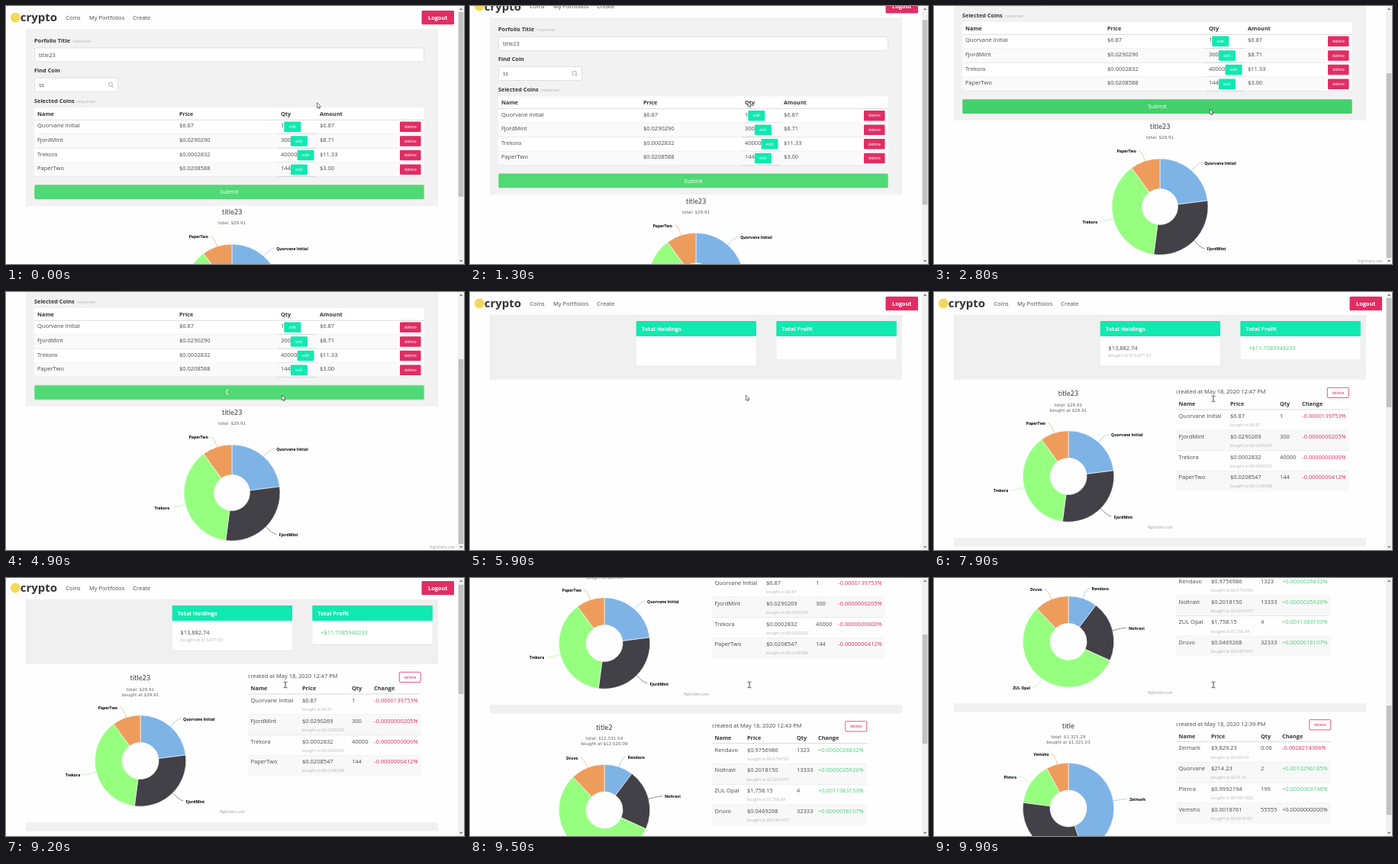
Recreate the animation shown at these times as an HTML page. Size 600 by 338 pixels, loop 10 s.

```html
<!DOCTYPE html>
<html lang="en">
<head>
<meta charset="utf-8">
<title>Crypto portfolio</title>
<style>
html, body { margin: 0; width: 100%; height: 100%; overflow: hidden; background: #fefefe; }
svg { display: block; width: 600px; height: 338px; }
text { font-family: "Open Sans", "Noto Sans", sans-serif; white-space: pre; }
.chart { font-family: "DejaVu Sans", sans-serif; }
</style>
</head>
<body>
<svg id="stage" viewBox="0 0 600 338"></svg>
<script>
const LOOP = 10000, STEP = 100, PITCH = 218.5;
const INK = '#4a4a4a', DARK = '#363636', PALE = '#b5b5b5', RED = '#e12d63';
const MINT = '#10e9b0', GREEN = '#51d975', GAIN = '#48cf78', LINE = '#dfdfdf';
const SLICES = ['#7eb3e6', '#434148', '#96ff80', '#ee9c5c'];

// name, price, quantity, amount
const picks = [
  ['Quorvane Initial', '$6.87', '1', '$6.87'],
  ['FjordMint', '$0.0290290', '300', '$8.71'],
  ['Trekora', '$0.0002832', '40000', '$11.33'],
  ['PaperTwo', '$0.0208588', '144', '$3.00']
];

// rows: name, price, bought at, quantity, change
const folios = [
  { title: 'title23', total: '$29.91', paid: '$29.91', time: '12:47', cols: [388, 453, 482], right: 543.5,
    shares: [6.87, 8.71, 11.33, 3],
    rows: [
      ['Quorvane Initial', '$6.87', '$6.87', '1', '-0.0000139753%'],
      ['FjordMint', '$0.0290269', '$0.0290290', '300', '-0.0000000205%'],
      ['Trekora', '$0.0002832', '$0.0002832', '40000', '-0.0000000000%'],
      ['PaperTwo', '$0.0208547', '$0.0208588', '144', '-0.0000000412%']
    ] },
  { title: 'title2', total: '$12,531.54', paid: '$12,520.09', time: '12:43', cols: [363, 428, 456], right: 520,
    shares: [1290.85, 2690.8, 7032.6, 1517.28],
    rows: [
      ['Rendavo', '$0.9756986', '$0.9754303', '1323', '+0.0000026832%'],
      ['Noltravi', '$0.2018150', '$0.2014557', '13333', '+0.0000035926%'],
      ['ZUL Opal', '$1,758.15', '$1,758.04', '4', '+0.0011383153%'],
      ['Druvo', '$0.0469268', '$0.0467457', '32333', '+0.0000018107%']
    ] },
  { title: 'title', total: '$1,321.29', paid: '$1,321.03', time: '12:39', cols: [363, 428, 456], right: 520,
    shares: [589.75, 428.46, 198.85, 104.23],
    rows: [
      ['Zelmark', '$9,829.23', '$9,829.51', '0.06', '-0.0028214366%'],
      ['Quorvane', '$214.23', '$214.10', '2', '+0.0013296185%'],
      ['Plimra', '$0.9992194', '$0.9991820', '199', '+0.0000003746%'],
      ['Vemsho', '$0.0018761', '$0.0018761', '55555', '+0.0000000000%']
    ] }
];

const rect = (x, y, w, h, fill, extra = '') =>
  `<rect x="${x}" y="${y}" width="${w}" height="${h}" fill="${fill}" ${extra}/>`;
const text = (x, y, s, size = 7.5, fill = INK, extra = '') =>
  `<text x="${x}" y="${y}" font-size="${size}" fill="${fill}" ${extra}>${s}</text>`;
const BOLD = 'font-weight="700"', MID = 'text-anchor="middle"', END = 'text-anchor="end"';
const bold = (x, y, s, fill = DARK) => text(x, y, s, 7.35, fill, BOLD);
const rule = (x1, x2, y, color = LINE, w = 0.6) =>
  `<path d="M${x1} ${y}H${x2}" stroke="${color}" stroke-width="${w}"/>`;
const button = (x, y, w, label, fill) =>
  rect(x, y, w, 13.5, fill, 'rx="1"') + text(x + w / 2, y + 8.6, label, 5.5, '#fff', MID);
const field = (y, w, s) =>
  rect(37.5, y, w, 18, '#fff', 'rx="1.5" stroke="#d6d6d6" stroke-width=".7"') + text(43, y + 11.8, s);

function header() {
  return `<circle cx="12.3" cy="15" r="6.4" fill="#f5d858"/>` +
    text(18.8, 20.3, 'crypto', 15, DARK, BOLD) +
    text(78.3, 17.8, 'Coins') + text(109, 17.8, 'My Portfolios') + text(166.3, 17.8, 'Create') +
    rect(544.5, 6, 42.5, 18.3, RED, 'rx="1.5"') +
    text(565.7, 17.9, 'Logout', 7.35, '#fff', BOLD + ' ' + MID);
}

// Donut whose slices grow from the inner ring by k, labels at the end
function donut(cx, cy, R, hole, shares, names, k = 1, labels = true) {
  const sum = shares.reduce((a, b) => a + b), r = hole + (R - hole) * k;
  const at = (a, d) => [cx + Math.sin(a) * d, cy - Math.cos(a) * d];
  const pt = (a, d) => at(a, d).map(v => v.toFixed(2)).join(' ');
  let acc = 0, out = '';
  shares.forEach((v, i) => {
    const turn = 2 * Math.PI * k / sum, a = acc * turn, b = (acc += v) * turn;
    const big = b - a > Math.PI ? 1 : 0;
    out += `<path d="M${pt(a, r)}A${r} ${r} 0 ${big} 1 ${pt(b, r)}L${pt(b, hole)}A${hole} ${hole} 0 ${big} 0 ${pt(a, hole)}Z" fill="${SLICES[i]}" stroke="#fff" stroke-width=".6"/>`;
    if (!labels) return;
    const m = (a + b) / 2, [x, y] = at(m, R + 14.2), side = Math.sin(m) < 0 ? -1 : 1;
    out += `<path d="M${x + side * 4} ${y}Q${x} ${y} ${pt(m, R)}" fill="none" stroke="${SLICES[i]}" stroke-width=".6"/>` +
      text(x + side * 7.2, y + 2.7, names[i], 5.1, '#000', BOLD + (side < 0 ? ' ' + END : ''));
  });
  return out;
}

const chartText = (x, y, s, size, fill) => text(x, y, s, size, fill, 'class="chart" ' + MID);
const names = rows => rows.map(r => r[0]);

function submit(state, t) {
  const fill = state === 'hover' ? '#44d06c' : GREEN;
  const ring = state === 'load' ? 'stroke="#8be9a4" stroke-width="1"' : '';
  let out = rect(37.3, 234.2, 510.4, 18.8, fill, 'rx="1.5" ' + ring);
  if (state !== 'load') return out + text(292.5, 246.3, 'Submit', 7.3, '#fff', MID);
  const spin = 45 + (t - 4900) / 500 * 360;
  return out + `<path d="M289.27 240.77A3.3 3.3 0 0 0 293.93 245.43" transform="rotate(${spin} 291.6 243.1)" fill="none" stroke="#fff" stroke-width=".9"/>`;
}

function formPage() {
  let out = header() + rect(26, 30, 540, 232, '#f2f2f2') +
    bold(37, 47.8, 'Porfolio Title') + text(87.3, 47.8, 'required', 6, PALE) + field(55, 510, 'title23') +
    bold(37, 87.2, 'Find Coin') + field(94.2, 109, 'ss') +
    `<g fill="none" stroke="#c4c4c4" stroke-width="1.1"><circle cx="136.8" cy="102.6" r="2.5"/><path d="M138.7 104.5L141 106.8"/></g>` +
    bold(37, 126.8, 'Selected Coins') + text(93, 126.8, 'required', 6, PALE) +
    rect(37, 133, 511, 90, '#fff') + rule(37, 548, 149.3, '#d2d2d2', 0.8);
  ['Name', 'Price', 'Qty', 'Amount'].forEach((s, i) => out += bold([41, 227, 360, 411][i], 143.8, s));
  picks.forEach(([name, price, qty, amount], i) => {
    const y = 149.4 + i * 18.6, base = y + 10;
    if (i % 2) out += rect(37, y, 511, 18.6, '#fafafa');
    out += rule(37, 548, y + 18.4) + rule(356, 407, y + 18.2, '#c9c9c9') +
      text(41, base, name) + text(227, base, price) + text(360, base, qty) + text(411, base, amount) +
      button(360 + qty.length * 4.3, y + 2.2, 22, 'edit', MINT) +
      button(516, y + 2.2, 27.5, 'delete', RED);
  });
  return out + chartText(296.3, 273.4, 'title23', 8.2, '#333') +
    chartText(296, 286.4, 'total: $29.91', 5.6, '#666') +
    donut(296, 375, 63, 23.5, folios[0].shares, names(picks)) +
    text(588, 447.8, 'Highcharts.com', 4.5, '#999', END);
}

function tile(x, w, h, label) {
  return rect(x - .5, 58, w + 1, h - 19.2, '#e3e3e3') + rect(x, 58, w, h - 20, '#fff') +
    rect(x, 38, w, 20, MINT) + bold(x + 7, 50.8, label, '#fff');
}

function hero() {
  return header() + rect(26, 30, 540, 85, '#f0f0f0') +
    tile(217.7, 157.3, 59, 'Total Holdings') + tile(401.3, 157.5, 50.5, 'Total Profit');
}

function folio(f, k, labels) {
  const { cols: [price, qty, change], right } = f;
  let out = chartText(176, 136.4, f.title, 8.2, '#333') +
    chartText(176, 149.5, 'total: ' + f.total, 5.6, '#666') +
    chartText(176, 156.8, 'bought at ' + f.paid, 5.6, '#666') +
    donut(176.1, 241.5, 59.7, 24, f.shares, names(f.rows), k, labels) +
    text(312.8, 310.3, 'Highcharts.com', 4.5, '#999', END) +
    text(317, 133.4, `created at May 18, 2020 ${f.time} PM`) +
    rect(right - 28.2, 125.3, 28, 13.2, '#fff', `rx="1" stroke="${RED}" stroke-width=".8"`) +
    text(right - 14.2, 133.8, 'delete', 5.6, RED, MID) + rule(317, right, 154, '#d2d2d2', 0.8);
  ['Name', 'Price', 'Qty', 'Change'].forEach((s, i) => out += bold([320.5, price, qty, change][i], 149.3, s));
  f.rows.forEach(([name, cost, paid, n, diff], i) => {
    const y = 154.4 + i * 26.7, base = y + 10.7;
    if (i % 2) out += rect(317, y, right - 317, 26.7, '#f8f8f8');
    const tone = /^-/.test(diff) ? RED : /[1-9]/.test(diff) ? GAIN : INK;
    if (i < 3) out += rule(317, right, y + 26.6);
    out += text(320.5, base, name) + text(price, base, cost) +
      text(price, base + 11.2, 'bought at ' + paid, 5.4, PALE) +
      text(qty, base, n) + text(change, base, diff, 7.5, tone);
  });
  return out;
}

function listPage(t) {
  const p = Math.min(1, Math.max(0, (t - 6630) / 1000));
  const k = (1 - Math.cos(Math.PI * p)) / 2;
  let out = hero() + text(228.5, 75.7, '$13,882.74') +
    text(228.5, 85, 'bought at $13,871.03', 5.7, PALE) +
    text(412.3, 75.7, '+$11.7085948233', 7.45, GAIN);
  folios.forEach((f, i) => {
    out += `<g transform="translate(0 ${i * PITCH})">${folio(f, k, p === 1)}` +
      (i < 2 ? rect(26, 322.3, 540, 11.3, '#f0f0f0') : '') + '</g>';
  });
  return out;
}

function scrollbar(y, height) {
  let out = rect(592, 0, 8, 338, '#f1f1f1') +
    `<path d="M594.3 5L596.2 2.8L598.1 5ZM594.3 333L596.2 335.2L598.1 333Z" fill="#606060"/>`;
  if (height > 338) out += rect(592.7, 8 + y / height * 322, 6.6, 338 / height * 322, '#c1c1c1');
  return out;
}

// Linear interpolation over [time, value] steps
function tween(steps, t) {
  if (t <= steps[0][0]) return steps[0][1];
  for (let i = 1; i < steps.length; i++) {
    const [t0, a] = steps[i - 1], [t1, b] = steps[i];
    if (t <= t1) return a + (b - a) * (t - t0) / (t1 - t0);
  }
  return steps[steps.length - 1][1];
}
const formScroll = [[1100, 0], [1200, 3], [1300, 14.7], [1400, 38], [1600, 88], [1700, 105], [1800, 112]];
const listScroll = [[9100, 0], [9200, 2], [9300, 32], [9400, 90], [9700, 288], [9800, 340], [9900, 376.6]];
const mouseX = [[100, 407.5], [400, 398], [900, 368], [1100, 364], [2200, 364], [2400, 361.3]];
const mouseY = [[100, 126.7], [1100, 125], [2200, 125], [2400, 135]];

function cursor(t) {
  if (t >= 6700)
    return `<path d="M363.6 136.2Q365.8 136.2 366 137.2Q366.2 136.2 368.4 136.2M366 137V143M363.6 143.8Q365.8 143.8 366 142.8Q366.2 143.8 368.4 143.8" fill="none" stroke="#222" stroke-width=".8"/>`;
  return `<path d="M0 0V7L1.6 5.6L2.7 8L3.8 7.5L2.8 5.2H4.9Z" transform="translate(${tween(mouseX, t)} ${tween(mouseY, t)})" fill="#fff" stroke="#222" stroke-width=".6"/>`;
}

const form = formPage();

function scene(t) {
  let page, y = 0, height = 338;
  if (t < 5200) {
    const state = t >= 3000 ? 'load' : t >= 2400 ? 'hover' : 'idle';
    page = form + submit(state, t);
    y = tween(formScroll, t);
    height = 450;
  } else if (t < 6700) {
    page = hero();
  } else {
    page = listPage(t);
    y = tween(listScroll, t);
    height = 761;
  }
  return `<g transform="translate(0 ${-y})">${page}</g>` + scrollbar(y, height) + cursor(t);
}

const stage = document.getElementById('stage');
const start = performance.now();
let shown = -1;
function draw() {
  const t = Math.floor((performance.now() - start) % LOOP / STEP) * STEP;
  if (t !== shown) stage.innerHTML = scene(shown = t);
  requestAnimationFrame(draw);
}
draw();
</script>
</body>
</html>
```
